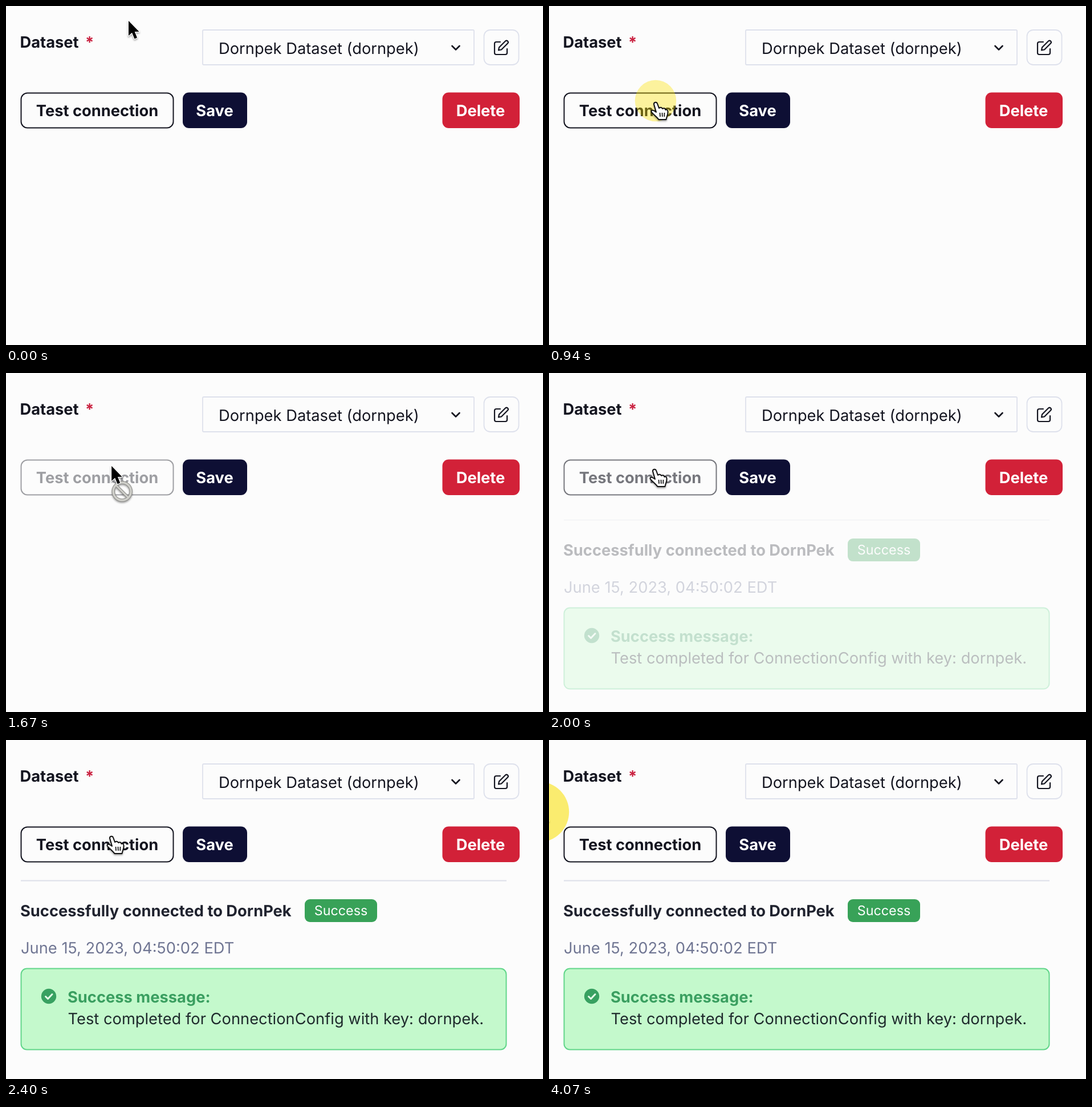
Recreate the animation shown at these times as an HTML page. Size 942x594 px, loop 4100 ms.

```html
<!DOCTYPE html>
<html lang="en">
<head>
<meta charset="utf-8">
<title>Connection test</title>
<style>
  html, body { margin: 0; width: 100%; height: 100%; overflow: hidden; background: #fcfcfc; }
  svg { display: block; width: 100vw; height: 100vh; }
  text { font: 400 27.3px Inter, sans-serif; text-rendering: geometricPrecision; fill: #141520; }
  .bold { font-weight: 700; }
  .middle { text-anchor: middle; }
  .light { fill: #fff; }
  .line { fill: none; stroke: #141520; stroke-width: 2.2; stroke-linecap: round; stroke-linejoin: round; }
  .field { fill: none; stroke: #dee1ec; stroke-width: 1.8; }
  #cursor { filter: drop-shadow(0 2px 1.5px rgba(0, 0, 0, .35)); }
</style>
</head>
<body>
<svg viewBox="0 0 942 594">
  <text class="bold" x="24.5" y="73">Dataset</text>
  <text class="bold" x="139" y="73" style="fill:#c9203f">*</text>

  <rect class="field" x="345" y="42" width="476" height="61" rx="2"/>
  <text x="373" y="84">Dornpek Dataset (dornpek)</text>
  <path class="line" style="stroke-width:2.7" d="M782.5 70l6.5 6.5 6.5-6.5"/>
  <rect class="field" x="838.5" y="42" width="61" height="61" rx="11"/>
  <path class="line" d="M867 63h-7a3 3 0 0 0-3 3v16a3 3 0 0 0 3 3h16a3 3 0 0 0 3-3v-7M876 61.5a2.8 2.8 0 0 1 4 4l-11 11-5 1 1-5z"/>

  <g id="test">
    <rect class="line" style="stroke-width:2" x="26.5" y="152.5" width="267" height="61" rx="11"/>
    <text class="bold middle" x="160" y="193">Test connection</text>
  </g>
  <rect x="310" y="151.5" width="113" height="62.5" rx="11" fill="#0e0f34"/>
  <text class="bold middle light" x="366" y="193">Save</text>
  <rect x="765.5" y="151.5" width="135.5" height="62.5" rx="11" fill="#d22138"/>
  <text class="bold middle light" x="832.5" y="193">Delete</text>

  <g id="result">
    <path d="M26 246.5H878" stroke="#dddfea" stroke-width="1.8"/>
    <text class="bold" x="25" y="309" style="fill:#20232f">Successfully connected to DornPek</text>
    <rect x="524" y="279" width="127" height="40" rx="9" fill="#38a258"/>
    <text class="middle light" x="587.5" y="307" style="font-size:23.3px">Success</text>
    <text x="26" y="374" style="fill:#707693">June 15, 2023, 04:50:02 EDT</text>
    <rect x="26.5" y="400.5" width="851" height="142" rx="10" fill="#c4f9cc" stroke="#62d68a" stroke-width="2"/>
    <circle cx="75" cy="449" r="13.2" fill="#38a161"/>
    <path class="line" style="stroke:#e4fbe8;stroke-width:3" d="M69.5 449.5l4 4 7.5-8"/>
    <text class="bold" x="108" y="460" style="fill:#3a9f60">Success message:</text>
    <text x="108.5" y="498" style="fill:#1e2a2c">Test completed for ConnectionConfig with key: dornpek.</text>
  </g>

  <circle id="ripple" fill="#fae000"/>
  <g id="cursor">
    <g id="blocked" fill="none">
      <path d="M7.5 33.5l22 22" stroke="#8b8b88" stroke-width="5"/>
      <circle cx="18.5" cy="44.5" r="15.5" stroke="#8b8b88" stroke-width="5.5"/>
      <path d="M7.5 33.5l22 22" stroke="#cfcfca" stroke-width="3"/>
      <circle cx="18.5" cy="44.5" r="15.5" stroke="#cfcfca" stroke-width="3.5"/>
    </g>
    <path id="arrow" d="M0 0V26L6 20.8 10.5 31.5 15 29.5 10.7 19H18.5Z"
      stroke="#fff" stroke-width="2.4" paint-order="stroke" stroke-linejoin="round"/>
    <g id="hand" transform="translate(1 6)">
      <path d="M-3 3C-3-1 2-1.5 3 2L6 10C8 8 11 8.5 12 11 14 9.5 17 10 17.5 13 19 12 21.5 13 21.5 16 22 22 19 25 18.5 30H5.5C3 26-3 22-7 17-9 14-5 12.5-2 15L1 17Z"
        fill="#fff" stroke="#111" stroke-width="2" stroke-linejoin="round"/>
      <path d="M7.5 18l.5 7M11.5 18l.3 7M15.5 18l-.2 7" stroke="#111" stroke-width="1.7"/>
    </g>
  </g>
</svg>
<script>
const LOOP = 4100;
const DISABLED_AT = 1350, RESULT_AT = 1930, LEAVE_AT = 3470;
const CLICKS = [870, 3530];
const $ = id => document.getElementById(id);
const show = (id, on) => $(id).style.display = on ? '' : 'none';
const progress = (t, start, length) => Math.min(1, Math.max(0, (t - start) / length));
const smooth = p => p * p * (3 - 2 * p);
const mix = (a, b, p) => a + (b - a) * p;

// Piecewise linear value through [time, value] pairs.
function track(points, t) {
  let value = points[0][1];
  for (let i = 1; i < points.length; i++) {
    const [start, from] = points[i - 1], [end, to] = points[i];
    if (t >= start) value = mix(from, to, progress(t, start, end - start));
  }
  return value;
}

function pointer(t) {
  if (t >= LEAVE_AT) {
    const p = progress(t, LEAVE_AT, 600);
    return [mix(184, -19, p ** 3.2), mix(163, 123, p ** 4)];
  }
  const down = smooth(progress(t, 40, 500));
  const aim = smooth(progress(t, 540, 320));
  const drift = smooth(progress(t, 1450, 500));
  return [215 - 97 * down + 68 * aim - 2 * drift, 26 + 157 * down - 20 * aim];
}

function drawRipple(t, x, y) {
  const age = t - (t < CLICKS[1] ? CLICKS[0] : CLICKS[1]);
  const ripple = $('ripple');
  ripple.setAttribute('cx', x + 1);
  ripple.setAttribute('cy', y + 3);
  ripple.setAttribute('r', track([[0, 0], [70, 36], [200, 67], [450, 67], [500, 62.5], [540, 53.5], [700, 0]], age));
  ripple.setAttribute('opacity', track([[0, 0], [70, .38], [200, .58], [540, .56], [700, 0]], age));
}

function draw(t) {
  const [x, y] = pointer(t);
  const disabled = t >= DISABLED_AT && t < RESULT_AT;
  const hovering = x > 26 && x < 294 && y > 152 && y < 214;
  const leaving = t > LEAVE_AT && x > 26;
  const hand = !disabled && (hovering || leaving);
  show('blocked', disabled);
  show('arrow', !hand);
  show('hand', hand);
  $('cursor').setAttribute('transform', `translate(${x} ${y})`);
  drawRipple(t, x, y);

  const shown = smooth(progress(t, RESULT_AT, 200));
  const faded = smooth(progress(t, DISABLED_AT + 20, 200));
  $('test').setAttribute('opacity', 1 - .6 * faded + .6 * shown);
  $('result').setAttribute('opacity', shown);
  $('result').setAttribute('transform', `translate(0 ${15.5 * (1 - shown)})`);
}

function frame() {
  draw(performance.now() % LOOP);
  requestAnimationFrame(frame);
}
frame();
</script>
</body>
</html>
```
